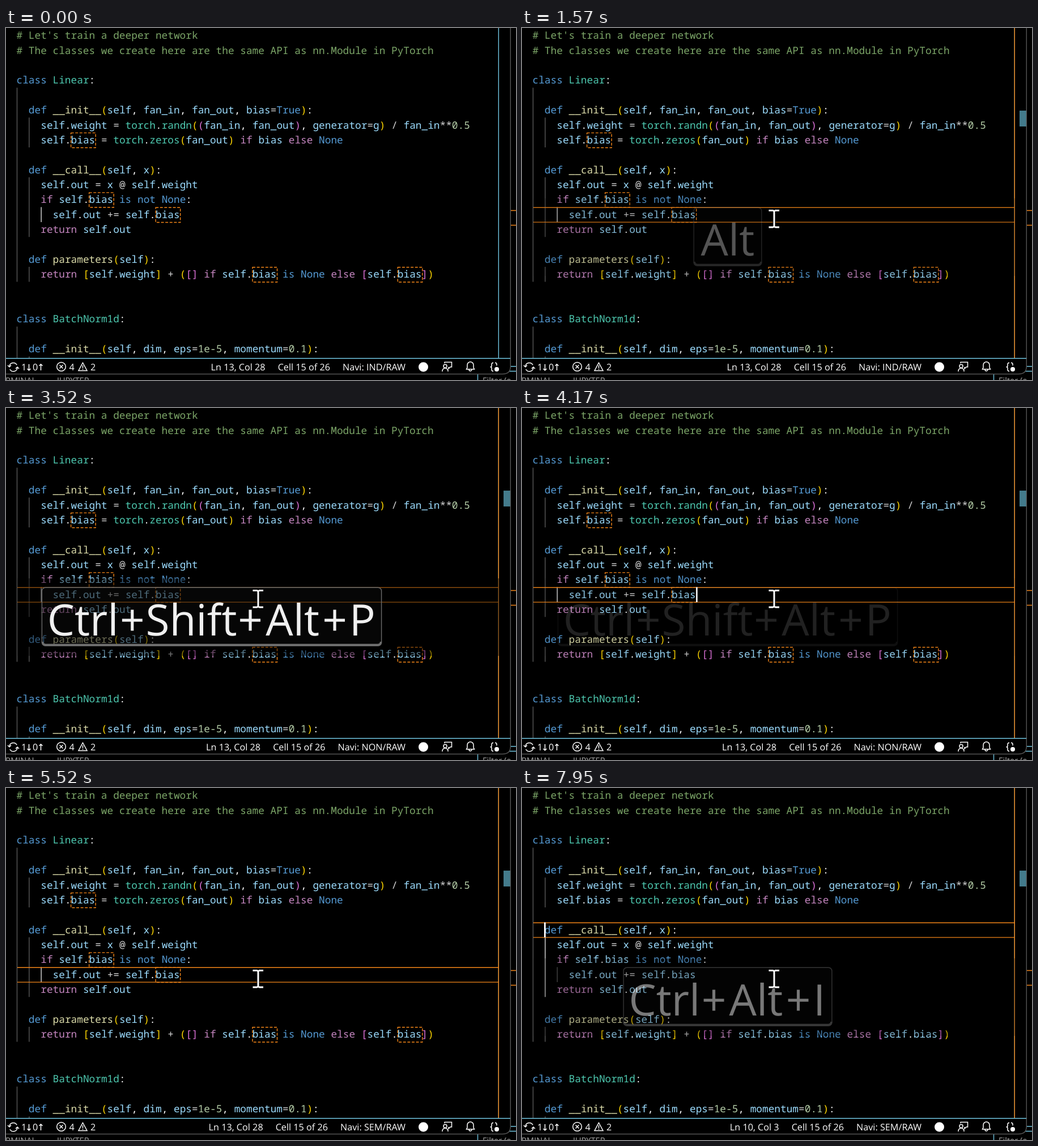
An HTML page that plays this animation: 900x622 px, repeating every 8000 ms.

```html
<!DOCTYPE html>
<html lang="en">
<head>
<meta charset="utf-8">
<title>Notebook cell navigation</title>
<style>
html, body { margin: 0; width: 100%; height: 100%; overflow: hidden; background: #000; }
svg { position: absolute; left: 0; top: 0; width: 900px; height: 622px; }
text, #status { text-rendering: geometricPrecision; }
#code { font: 17.8px "Noto Sans Mono", monospace; fill: #fff; }
.ui { font: 16.2px "Open Sans", sans-serif; fill: #fff; }
.key { font: 76.5px "Open Sans", sans-serif; fill: #f0f0f0; text-anchor: middle; }
.line { fill: none; stroke-width: 1.4; }
.icon { fill: none; stroke: #fff; stroke-width: 1.5; }
.dim { stroke: #585858; }
.lit { stroke: #c8c8c8; }
.cyan { stroke: #6fc3df; }
.orange { stroke: #f38518; }

#status { position: absolute; left: 0; top: 585.5px; width: 705px; height: 27px; }
#status div {
  position: absolute; right: 0; top: 0; display: flex; gap: 22px; white-space: nowrap;
  font: 16.2px/27px "Open Sans", sans-serif; color: #fff;
}

/* One 8 s timeline: 1% is 80 ms */
.t { animation: 8s step-end infinite; }
#focus { animation-name: focus; }
#row { animation-name: row; }
#caret { animation-name: blink; }
#before { animation-name: before; }
#after { animation-name: after; }
#cast { animation-name: cast; }
#slider { animation: slider 8s linear infinite; }
#mouse { animation: mouse 8s linear infinite; }
@keyframes focus { 0% { visibility: hidden } 12% { visibility: visible } }
@keyframes row { 0% { transform: none } 99.375% { transform: translateY(-79.1px) } }
@keyframes before { 0% { visibility: visible } 99.375% { visibility: hidden } }
@keyframes after { 0% { visibility: hidden } 99.375% { visibility: visible } }
@keyframes blink {
  0%, 18.75%, 31.375%, 44%, 56.6%, 69%, 80.75%, 93.625% { opacity: 0; transform: none }
  12%, 24.75%, 37.25%, 49.625%, 62.25%, 74.75%, 87.875% { opacity: 1; transform: none }
  99.375% { opacity: 1; transform: translate(-268px, -79.1px) }
}
@keyframes cast {
  0%, 49.625%, 62.25% { opacity: 0 }
  18.75%, 52.125% { opacity: .14 }
  19.625%, 53.1% { opacity: .35 }
  20.5%, 53.9% { opacity: .57 }
  21.4%, 54.8% { opacity: .78 }
  22.25%, 55.6% { opacity: 1 }
  98.5% { opacity: .28 }
  99.375% { opacity: .5 }
}
@keyframes slider { 0%, 2.5% { opacity: 0 } 3.75%, 100% { opacity: 1 } }
@keyframes mouse {
  0%, 2.49% { visibility: hidden; transform: translate(155px, 256px) }
  2.5% { visibility: visible; transform: translate(155px, 256px); animation-timing-function: ease-out }
  7% { visibility: visible; transform: translate(-7px, 6px) }
  8.25%, 100% { visibility: visible; transform: none }
}
#key0 { animation-name: key0; }
#key1 { animation-name: key1; }
#key2 { animation-name: key2; }
#key3 { animation-name: key3; }
@keyframes key0 { 0% { visibility: visible } 27.25% { visibility: hidden } }
@keyframes key1 { 0% { visibility: hidden } 27.25% { visibility: visible } 40.625% { visibility: hidden } }
@keyframes key2 { 0% { visibility: hidden } 40.625% { visibility: visible } 98.5% { visibility: hidden } }
@keyframes key3 { 0% { visibility: hidden } 98.5% { visibility: visible } }
#st0 { animation-name: st0; }
#st1 { animation-name: st1; }
#st2 { animation-name: st2; }
#st3 { animation-name: after; }
@keyframes st0 { 0% { visibility: visible } 41.5% { visibility: hidden } }
@keyframes st1 { 0% { visibility: hidden } 41.5% { visibility: visible } 53.9% { visibility: hidden } }
@keyframes st2 { 0% { visibility: hidden } 53.9% { visibility: visible } 99.375% { visibility: hidden } }
</style>
</head>
<body>
<svg viewBox="0 0 900 622">
  <g id="guides" class="line dim"></g>
  <g id="code"></g>
  <g id="before" class="t line"></g>
  <g id="after" class="t line"></g>

  <path class="line cyan" d="M869.3 0V583"/>
  <g id="focus" class="t line orange">
    <path d="M869.3 0V583"/>
    <path id="row" class="t" d="M20 317.2H869M20 343.1H869"/>
  </g>
  <rect id="caret" class="t" x="307" y="316.5" width="2.8" height="26.5" fill="#fff"/>
  <rect id="slider" x="878" y="146" width="12" height="28" fill="#437b8c"/>

  <!-- window behind -->
  <path class="line orange" d="M891 322.5H900M891 348.5H900"/>
  <path class="line cyan" d="M888 598H900M900 606.5H832.5V622"/>
  <g class="ui" style="font-size:14.6px;fill:#a8a8a8">
    <text x="-1" y="627.5">RMINAL</text>
    <text x="90" y="627.5">JUPYTER</text>
    <text x="841" y="627.5">Filter (e</text>
  </g>

  <!-- status bar -->
  <path d="M0 583.5H890V599Q890 611.5 877 611.5H0Z"/>
  <path class="line" stroke="#555" d="M890.3 0V598Q890.3 611.5 876 611.5H0"/>
  <path class="line cyan" d="M0 583.8H890"/>
  <g class="icon">
    <path d="M6 598a7 7 0 0 1 13.2-2.5M20 600.5a7 7 0 0 1-13.2 2.5M3 596l3 3 3-3M17 602l3-3 3 3"/>
    <path d="M40.5 594v11M37.5 602l3 3 3-3M61.5 605v-11M58.5 597l3-3 3 3"/>
    <circle cx="97.5" cy="598.5" r="7.8"/>
    <path d="M94.5 595.5l6 6M100.5 595.5l-6 6"/>
    <path d="M135.5 591.5l7.5 14h-15zM135.5 596v5M135.5 602.3v1.5"/>
    <circle cx="775" cy="597.5" r="3"/>
    <path d="M770 607v-1a5 5 0 0 1 10 0v1M774 592.5v-2h12.5v8.5h-2.5l-3 3v-3"/>
    <path d="M812.5 603h14l-1.5-3v-4.5a5.5 5.5 0 0 0-11 0v4.5zM817 603.5a2.5 2.5 0 0 0 5 0"/>
    <path d="M860 591.5q-3 0-3 3v2.5q0 2-2.5 2 2.5 0 2.5 2v2.5q0 3 3 3M863 591.5q3 0 3 3v2"/>
  </g>
  <circle cx="736.5" cy="599" r="8.5" fill="#fff"/>
  <circle cx="866" cy="603" r="4" fill="#fff"/>
  <g class="ui">
    <text x="27" y="605">1</text><text x="47" y="605">0</text>
    <text x="111.5" y="605">4</text><text x="149" y="605">2</text>
  </g>
</svg>

<div id="status"></div>

<svg viewBox="0 0 900 622">
  <g id="cast" class="t">
    <rect x="20" y="301" width="850" height="137" opacity=".43"/>
    <g id="keys"></g>
  </g>
  <path id="mouse" fill="#fff" stroke="#000"
    d="M435 320.5h8l2 1 2-1h7.500v4h-7.500v25.500h7.500v4h-7.500l-2-1-2 1h-8v-4h8v-25.500h-8z"/>
</svg>

<script>
const X0 = 18.5, CW = 10.68, LH = 26.38;
const byId = id => document.getElementById(id);
const colX = c => X0 + c * CW;

const source = `# Let's train a deeper network
# The classes we create here are the same API as nn.Module in PyTorch

class Linear:

  def __init__(self, fan_in, fan_out, bias=True):
    self.weight = torch.randn((fan_in, fan_out), generator=g) / fan_in**0.5
    self.bias = torch.zeros(fan_out) if bias else None

  def __call__(self, x):
    self.out = x @ self.weight
    if self.bias is not None:
      self.out += self.bias
    return self.out

  def parameters(self):
    return [self.weight] + ([] if self.bias is None else [self.bias])


class BatchNorm1d:

  def __init__(self, dim, eps=1e-5, momentum=0.1):`;

const palette = [
  [/^#/, '#7ca668'],
  [/^(class|def|True|None|is|not)$/, '#569cd6'],
  [/^(if|else|return)$/, '#c586c0'],
  [/^(Linear|BatchNorm1d|torch|randn|zeros)$/, '#4ec9b0'],
  [/^(__\w+__|parameters)$/, '#dcdcaa'],
  [/^\d/, '#b5cea8'],
  [/^\w/, '#9cdcfe'],
  [/^[=+*\/@]/, '#d4d4d4']
];
const brackets = ['#ffd700', '#da70d6'];

function paintLine(line, row) {
  let depth = 0;
  const indent = line.search(/\S|$/);
  const tokens = line.trim().match(/#.*|\d[\w.]*(-\d)?|\w+|\s+|./g) || [];
  const body = tokens.map(s => {
    let color;
    if (/^[(\[]$/.test(s)) color = brackets[depth++];
    else if (/^[)\]]$/.test(s)) color = brackets[--depth];
    else color = (palette.find(p => p[0].test(s)) || [0, '#fff'])[1];
    return `<tspan fill="${color}">${s}</tspan>`;
  }).join('');
  return `<text x="${colX(indent)}" y="${(row * LH + 19.2).toFixed(1)}">${body}</text>`;
}
byId('code').innerHTML = source.split('\n').map(paintLine).join('');

// Indent guide at a column, spanning lines a up to b
const guide = (col, a, b, cls = '') =>
  `<path class="${cls}" d="M${colX(col) + 1} ${a * LH}V${Math.min(b * LH, 583)}"/>`;
byId('guides').innerHTML = guide(0, 4, 17) + guide(0, 20, 23) + guide(2, 6, 8) +
  guide(2, 10, 14) + guide(2, 16, 17) + guide(2, 22, 23) + guide(4, 12, 13);

const matchBox = ([row, col]) => `<rect class="orange" stroke-dasharray="5 2.6"
  x="${colX(col)}" y="${row * LH + .7}" width="${4 * CW + .8}" height="${LH - .2}"/>`;
byId('before').innerHTML = guide(4, 12, 13, 'lit') +
  [[7, 9], [11, 12], [12, 23], [16, 39], [16, 63]].map(matchBox).join('');
byId('after').innerHTML = guide(2, 10, 14, 'lit');

// Key caps, centred on one axis
const advance = { Ctrl: 120.7, Shift: 155, Alt: 95.6, P: 43.7, I: 20.7, '+': 53.4 };
function keyCap(combo, i) {
  const parts = combo.split(/(\+)/);
  const w = parts.reduce((sum, p) => sum + advance[p], 24);
  const left = 363 - w / 2;
  let x = left + 12;
  const label = parts.map(p => {
    const mid = x + advance[p] / 2;
    x += advance[p];
    return `<text class="key" x="${mid}" y="402">${p}</text>`;
  }).join('');
  return `<g id="key${i}" class="t">
    <rect x="${left}" y="317.2" width="${w}" height="103" rx="6" fill="#222" fill-opacity=".2" stroke="#6a6a6a" stroke-width="1.4"/>
    <path d="M${left + 1} 413q0 5.5 6 5.5h${w - 14}q6 0 6-5.5" fill="none" stroke="#6e6e6e" stroke-width="3.5"/>
    ${label}</g>`;
}
byId('keys').innerHTML =
  ['Alt', 'Ctrl+Shift+Alt', 'Ctrl+Shift+Alt+P', 'Ctrl+Alt+I'].map(keyCap).join('');

byId('status').innerHTML = [
  ['Ln 13, Col 28', 'IND'], ['Ln 13, Col 28', 'NON'],
  ['Ln 13, Col 28', 'SEM'], ['Ln 10, Col 3', 'SEM']
].map(([pos, mode], i) => `<div id="st${i}" class="t"><span>${pos}</span>
  <span>Cell 15 of 26</span><span>Navi: ${mode}/RAW</span></div>`).join('');
</script>
</body>
</html>
```
